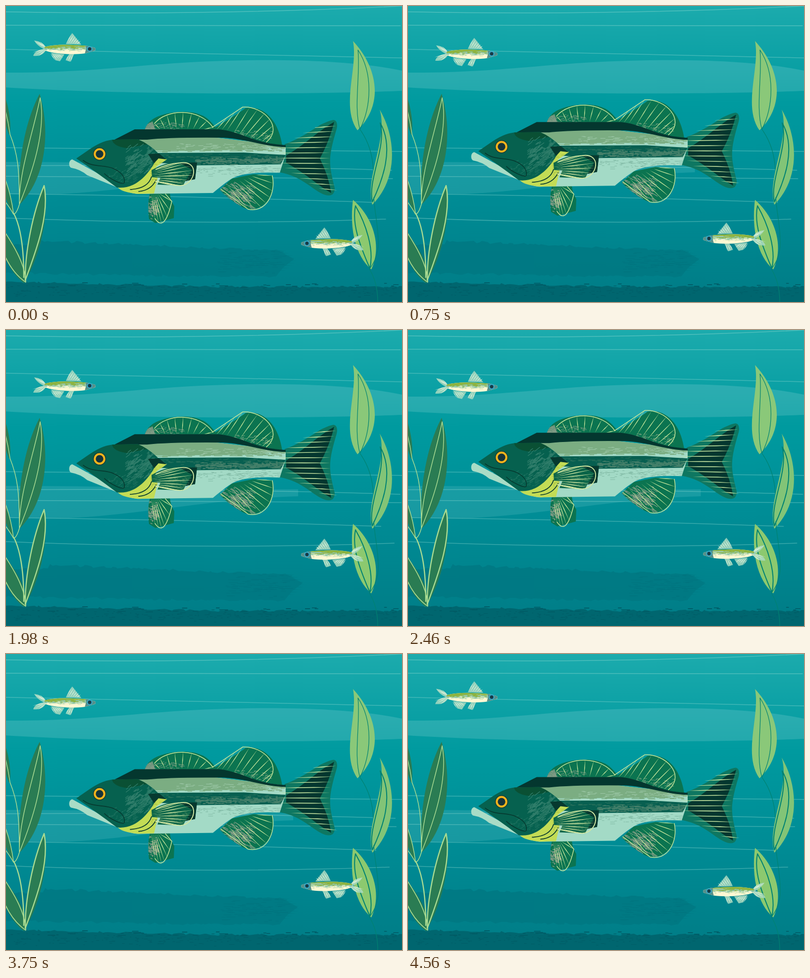
An HTML page that plays this animation: 800x600 px, repeating every 4.59 s.

```html
<!DOCTYPE html>
<html lang="en">
<head>
<meta charset="utf-8">
<title>Bass and minnows</title>
<style>
html, body { margin: 0; width: 100%; height: 100%; overflow: hidden; background: #00929a; }
svg { display: block; width: 100%; height: 100%; }
</style>
</head>
<body>
<svg id="stage" viewBox="0 0 800 600"></svg>
<script>
const LOOP = 4590;

function seeded(s) {
  return () => {
    s = (s + 0x6D2B79F5) | 0;
    let t = Math.imul(s ^ (s >>> 15), 1 | s);
    t = (t + Math.imul(t ^ (t >>> 7), 61 | t)) ^ t;
    return ((t ^ (t >>> 14)) >>> 0) / 4294967296;
  };
}
const r1 = v => Math.round(v * 10) / 10;
const mix = (a, b, t) => a + (b - a) * t;
const clamp = t => Math.max(0, Math.min(1, t));
const times = (n, f) => Array.from({ length: n }, (_, i) => f(i, i / (n - 1))).join('');
const fill = (d, c, more = '') => `<path d="${d}" fill="${c}" ${more}/>`;
const line = (d, c, w = 1.5, more = '') =>
  `<path d="${d}" fill="none" stroke="${c}" stroke-width="${w}" stroke-linecap="round" stroke-linejoin="round" ${more}/>`;

let serial = 0;
function clipped(d, inner) {
  const id = 'c' + serial++;
  return `<clipPath id="${id}"><path d="${d}"/></clipPath><g clip-path="url(#${id})">${inner}</g>`;
}
const shape = (d, c, inner) => fill(d, c) + clipped(d, inner);

// Dry-brush flecks scattered in a box; slope tilts them.
function flecks(n, [x, y, w, h], len, color, sw = 1.2, slope = 0) {
  const rnd = seeded(serial++);
  const d = times(n, () => {
    const l = len * (0.2 + rnd() * rnd());
    return `M${r1(x + w * rnd())} ${r1(y + h * (rnd() + rnd()) / 2)}l${r1(l)} ${r1(l * slope)}`;
  });
  return `<path d="${d}" fill="none" stroke="${color}" stroke-width="${sw}"/>`;
}

// Torn horizontal edge between two x positions, following y(x).
function torn(x0, x1, y, rough) {
  const rnd = seeded(serial++), dir = Math.sign(x1 - x0);
  let d = '';
  for (let x = x0; (x1 - x) * dir > 0; x += dir * (2 + rnd() * 10)) {
    d += `L${r1(x)} ${r1(y(x) + (rnd() - 0.5) * rough)}`;
  }
  return d;
}

// Lens-shaped spine, pointed at both ends.
function spine(a, b, c, e, w) {
  const l = Math.hypot(c - a, e - b), nx = (b - e) / l * w, ny = (c - a) / l * w;
  const mx = (a + c) / 2, my = (b + e) / 2;
  return `M${r1(a)} ${r1(b)}Q${r1(mx + nx)} ${r1(my + ny)} ${r1(c)} ${r1(e)}Q${r1(mx - nx)} ${r1(my - ny)} ${r1(a)} ${r1(b)}`;
}

// Spines fanning from a straight base to a cubic arc, reaching slightly past it.
function fan(n, base, arc, color, w = 1.5, reach = 1.06) {
  const at = (t, k) => {
    const u = 1 - t;
    return u * u * u * arc[k] + 3 * u * u * t * arc[k + 2] + 3 * u * t * t * arc[k + 4] + t * t * t * arc[k + 6];
  };
  return fill(times(n, (i, t) => {
    const x = mix(base[0], base[2], t), y = mix(base[1], base[3], t);
    return spine(x, y, mix(x, at(t, 0), reach), mix(y, at(t, 1), reach), w);
  }), color);
}
const straight = (a, b, c, d) => [a, b, mix(a, c, 1 / 3), mix(b, d, 1 / 3), mix(a, c, 2 / 3), mix(b, d, 2 / 3), c, d];
const arcPath = a => `M${a[0]} ${a[1]}C${a.slice(2)}`;

// Leaf from tip to base; right and left give how far each side is pulled out, near the tip and near the base.
function leaf([x0, y0], [x1, y1], right, left) {
  const l = Math.hypot(x1 - x0, y1 - y0), nx = (y1 - y0) / l, ny = (x0 - x1) / l;
  const p = (t, o) => `${r1(mix(x0, x1, t) + nx * o)} ${r1(mix(y0, y1, t) + ny * o)}`;
  return `M${x0} ${y0}C${p(.3, right[0])} ${p(.72, right[1])} ${x1} ${y1}C${p(.72, left[1])} ${p(.3, left[0])} ${x0} ${y0}Z`;
}

// A long drifting line with some sag.
const drift = (y0, sag, y1, x1) => `M-40 ${y0}Q${x1 / 2} ${(y0 + y1) / 2 + sag} ${x1} ${y1}`;
const ripples = (d, o) => line(d, '#8fd8cf', 1.5, `opacity="${o}"`);

function water() {
  return `<linearGradient id="sea" x1="0" y1="0" x2="0" y2="1">
    <stop offset="0" stop-color="#1cabad"/><stop offset=".16" stop-color="#0ea2a6"/>
    <stop offset=".33" stop-color="#009a9f"/><stop offset=".62" stop-color="#008d96"/>
    <stop offset="1" stop-color="#007c86"/></linearGradient>
    <rect width="800" height="600" fill="url(#sea)"/>` +
    fill('M0 135C130 136 230 124 340 116C500 106 680 106 800 131V172C600 180 240 180 0 165Z', '#fff', 'opacity=".13"') +
    ripples(drift(11, 15, 0, 800) + drift(39, 1, 40, 797), .45);
}

function currents() {
  return fill('M-40 316C200 315 400 324 573 323V337C400 342 260 374 110 381H-40Z', '#6fc3c6', 'opacity=".22"') +
    ripples(drift(87, 2, 106, 830) + drift(287, 0, 295, 820) + drift(324, -8, 333, 779) +
      drift(345, 0, 350, 781) + drift(380, -4, 398, 740) + drift(428, 16, 432, 767), .4);
}

function shadow() {
  const c = '#007781';
  const top = x => x < 70 ? 484 : mix(476, 496, clamp((x - 70) / 480));
  const tip = (n, x, y) => times(n, (i, t) => spine(x - 90, mix(y, y + 40, t), x + 20 * Math.sin(t * Math.PI), mix(y, y + 40, t), 3));
  return '<g opacity=".72">' +
    fill('M-40 543' + torn(-40, 550, top, 5) + 'L582 513L560 530' + torn(545, -40, x => mix(541, 548, clamp(x / 400)), 5) + 'Z', c) +
    fill(tip(9, 566, 496), c) +
    flecks(90, [425, 488, 125, 60], 30, '#00707b') + '</g>';
}

function sand() {
  const top = x => mix(559, 569, clamp(x / 420));
  return fill('M-40 600' + torn(-40, 820, top, 4) + 'V600Z', '#00666f') +
    flecks(40, [-30, 559, 830, 13], 22, '#005a64', 1.6) +
    flecks(240, [-30, 564, 830, 30], 12, '#005c66', 1);
}

function leftWeeds() {
  const green = '#2a7c53', edge = '#a9db92';
  return [
    leaf([-8, 165], [7, 262], [6, 10], [-8, -8]),
    leaf([-14, 322], [14, 420], [4, 8], [-8, -8]),
    leaf([68, 178], [28, 402], [34, 44], [-22, -18]),
    leaf([77, 363], [37, 560], [24, 20], [-12, -12]),
    leaf([-14, 440], [37, 562], [6, 28], [-20, -22])
  ].map(d => fill(d, green)).join('') +
    line(leaf([69, 186], [27, 402], [26, 12], [0, -14]) +
      'M-4 202Q4 230 8 260C24 300 27 330 27 402Q21 422 15 422Q10 412 -2 396M-4 345Q10 380 15 420', edge) +
    line(leaf([77, 364], [39, 556], [24, 8], [-12, -12]) + 'M16 421Q36 460 36 550', edge, 2.4) +
    line(leaf([-14, 440], [40, 560], [6, 16], [-22, -22]), edge, 1.7);
}

function rightWeeds() {
  const vein = '#008272';
  return fill(leaf([701, 71], [710, 252], [46, 58], [8, -32]), '#8ac879') +
    fill(leaf([755, 210], [740, 403], [40, 46], [22, -20]), '#82c477') +
    fill(leaf([701, 393], [738, 534], [30, 34], [-18, -28]), '#8cc96f') +
    line(leaf([711, 89], [715, 250], [30, 24], [4, -12]) + 'M715 250Q740 285 742 332M743 388C745 421 751 438 752 476Q753 510 734 533Q751 560 751 600', vein, 1.2) +
    line(leaf([756, 237], [740, 397], [34, 16], [18, -14]) + leaf([706, 405], [735, 532], [12, 18], [-18, -6]), vein, 2);
}

function fins() {
  const green = '#0b7450', grey = '#7e9a84', pale = '#c4e59a';
  const front = [300, 238, 325, 208, 390, 206, 418, 246];
  const rear = [478, 205, 520, 202, 562, 246, 526, 276];
  const anal = [489, 412, 525, 420, 546, 380, 538, 344];
  const pelvic = [301, 431, 315, 452, 326, 435, 335, 396];
  return shape('M280 251Q285 238 293 232C315 214 370 209 394 221Q410 226 428 253Z', green,
      fill('M278 252L283 241L296 234L302 252Z', grey) + flecks(70, [278, 234, 80, 18], 9, '#5f9076')) +
    fan(9, [311, 250, 400, 250], front, pale) + line(arcPath(front), pale) +
    shape('M416 250Q464 222 484 207C520 201 550 230 558 283L430 260Z', green, flecks(90, [455, 250, 80, 27], 10, '#5d9775')) +
    fan(3, [425, 251, 446, 253], straight(446, 227, 478, 205), pale) +
    fan(6, [460, 258, 515, 276], [492, 206, 520, 208, 545, 232, 541, 256], pale, 1.5, 1.02) +
    line('M417 246L478 205' + arcPath(rear).replace('M', 'L'), pale) +
    shape('M432 373L456 350L500 341L538 344C550 392 508 424 478 408Q450 392 432 373Z', green,
      flecks(190, [432, 354, 62, 58], 14, grey, 1.3, .6)) +
    fan(8, [446, 362, 505, 342], anal, pale, 1.5, 1.02) + line('M434 371L489 412' + arcPath(anal), pale) +
    shape('M291 379H331Q332 393 340 406L339 430L302 440L289 432Q285 400 291 379Z', green,
      flecks(110, [284, 381, 22, 58], 9, grey, 1.4, .4)) +
    fan(7, [294, 380, 309, 380], pelvic, pale) + line(arcPath(pelvic) + 'L322 381', pale);
}

function tail() {
  return fill('M563 280C587 272 612 256 635 241Q655 231 662 231C669 232 670 241 668 249C650 310 652 320 664 369Q664 388 645 383C620 375 600 345 552 337Z', '#0e7761') +
    fill('M566 303C600 284 632 252 663 235Q653 275 634 309Q652 345 657 379C629 363 601 336 566 318Z', '#04372f');
}

function tailSpines() {
  return fill(times(13, i => {
    const u = (i - 5.7) / 6, y = 247 + 10.2 * i;
    return spine(545 + 80 * Math.abs(u) ** 1.6, y, 655 + 13 * u * u, y + 4 * u, 1.7);
  }), '#cdeaa4');
}

function body() {
  const sage = '#7bad82';
  return shape('M235 268L400 264L565 283V301L553 338Q490 335 462 347Q450 352 418 379L265 381Q240 378 225 366Z', '#a3dac6',
      fill('M235 268L400 262L565 284L480 292L300 293Z', sage) +
      flecks(190, [300, 278, 260, 19], 30, sage, 1.5) + flecks(70, [340, 276, 210, 18], 16, '#98c4a2') +
      flecks(110, [385, 321, 165, 25], 14, '#82bba6', 1)) +
    shape('M290 298L480 297L565 302L555 321L385 323L310 318Z', '#075f50',
      flecks(200, [380, 305, 180, 17], 18, '#437f69', 1.6) + flecks(80, [305, 298, 250, 15], 16, '#2b735d', 1)) +
    fill('M219 271L260 250H430C475 254 500 279 565 282V286C520 285 490 270 440 267Q330 266 285 271Z', '#04372f') +
    shape('M300 300L325 311L303 326L306 350L299 380L268 381Q235 378 226 368L260 345Z', '#c3dc55',
      flecks(80, [290, 315, 24, 48], 9, '#a5bd45'));
}

const INK = '#06392f';

function head() {
  const lit = '#2f7d6a';
  return fill('M134 311C126 312 126 326 132 328Q150 331 164 343L228 369L214 355Z', '#a9dcc6') +
    shape('M142 309L171 289Q198 271 219 271L266 270Q290 280 309 300C290 342 262 372 224 368Q180 335 142 309Z', '#06614f',
      fill('M214 270H264L292 279L245 288Q224 286 216 276Z', '#0a5034') +
      fill('M289 280C283 308 266 337 240 350C258 347 278 329 291 310Z', lit, 'opacity=".6"') +
      flecks(160, [240, 284, 54, 66], 14, lit, 1.3, -.75) + flecks(60, [205, 325, 58, 38], 12, '#1e725f', 1.1, -.5)) +
    fill('M287 300L309 299L324 311L308 309L299 319Z', INK) +
    line('M156 313C174 328 200 321 218 330C233 337 241 347 239 358C236 364 209 350 199 340M294 346Q287 370 251 372M303 353Q293 374 268 376', INK, 1.7) +
    `<circle cx="189" cy="300" r="13.2" fill="#163e3a"/><circle cx="189" cy="300" r="9.7" fill="#17343a" stroke="#f5b41c" stroke-width="4"/>`;
}

function pectoral() {
  const pale = '#d3e8a3', edge = [352, 318, 392, 312, 384, 362, 352, 364];
  return shape('M294 333Q320 317 344 318L386 317L382 351L362 355L358 364L306 362L312 348L295 347Z', '#0a6448',
      fill('M345 315H387L382 352L362 356L376 332Z', INK) + flecks(90, [294, 332, 74, 30], 12, '#337c56')) +
    fan(8, [296, 334, 300, 354], edge, pale, 1.6, 1) +
    line('M303 331Q325 320 352 318' + arcPath(edge).replace('M', 'L') + 'Q325 362 302 355', pale, 1.9);
}

function minnow() {
  const pale = '#a9dac0', white = '#e4f3dc', olive = '#8db33f', cream = '#fff8d3';
  const rays = (n, base, tips) => fan(n, base, straight(...tips), white, 1.3, 1);
  return fill('M121 77L134 55L152 78ZM91 95L100 110L109 112L118 98ZM121 110L130 113L138 97H128ZM82 87Q75 72 57 70Q62 80 76 87Q58 90 55 101Q75 103 82 87Z', pale, 'opacity=".85"') +
    rays(6, [121, 77, 143, 77], [134, 54, 151, 71]) +
    rays(5, [90, 96, 104, 97], [99, 110, 115, 105]) +
    rays(3, [128, 98, 135, 98], [120, 111, 131, 113]) +
    rays(3, [82, 86, 82, 85], [56, 70, 69, 72]) + rays(3, [82, 87, 82, 88], [54, 94, 65, 102]) +
    shape('M78 83Q105 75 166 81L180 85Q183 89 178 91L160 96C135 99 100 98 78 90Z', cream,
      fill('M76 82H162V89Q120 92 76 89Z', '#93c7a9') + fill('M76 74H162V82Q110 81 76 86Z', olive) +
      flecks(50, [78, 79, 78, 9], 12, olive) + flecks(45, [82, 84, 74, 9], 11, '#cfe6b9') +
      flecks(24, [82, 87, 74, 8], 12, cream, 1.4) + fill('M159 74H185V97H159L162 86Z', '#55908b')) +
    '<circle cx="169" cy="87" r="4.6" fill="#173b46" stroke="#35aed0" stroke-width="2"/>';
}

const stage = document.getElementById('stage');
stage.innerHTML = water() +
  `<g id="flow">${currents()}${shadow()}</g>${sand()}` +
  leftWeeds() + rightWeeds() +
  `<g id="bass">${fins()}${tail()}${body()}${head()}${pectoral()}${tailSpines()}</g>` +
  `<g id="minnowA">${minnow()}</g><g id="minnowB">${minnow()}</g>`;

const [flow, bass, minnowA, minnowB] =
  ['flow', 'bass', 'minnowA', 'minnowB'].map(id => document.getElementById(id));
const move = (el, t) => el.setAttribute('transform', t);

function draw(ms) {
  const k = 1 - Math.abs(1 - 2 * (ms % LOOP) / LOOP);
  move(flow, `translate(${20 * k} 0)`);
  move(bass, `translate(0 ${-45 * k})`);
  move(minnowA, `translate(0 ${30 * k})`);
  move(minnowB, `translate(777 ${394 - 30 * k}) scale(-1 1)`);
}

const start = performance.now();
function tick(now) {
  draw(Math.max(0, now - start));
  requestAnimationFrame(tick);
}
draw(0);
requestAnimationFrame(tick);
</script>
</body>
</html>
```
